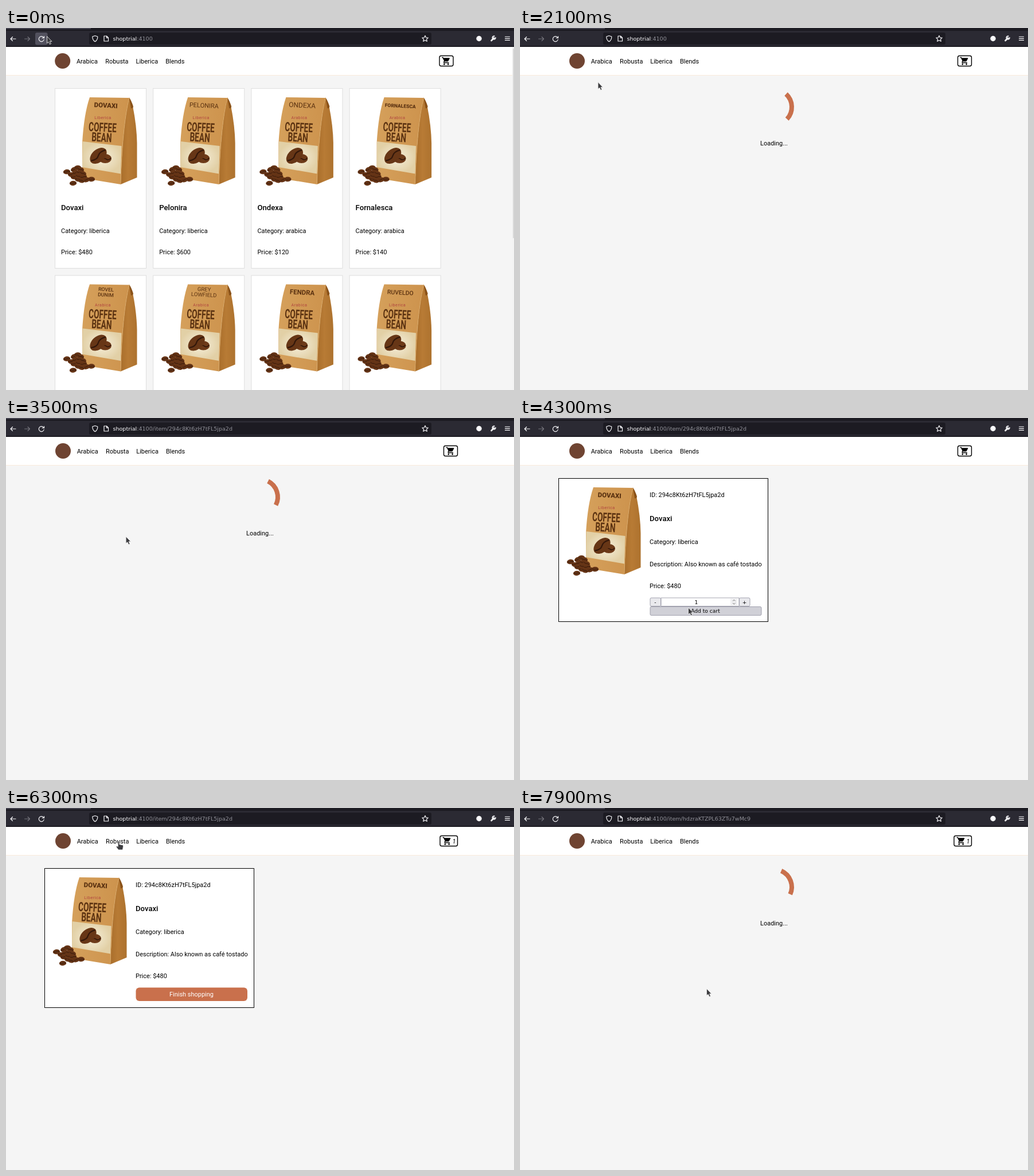
Recreate the animation shown at these times as an HTML page. Size 886x632 px, loop 8000 ms.

```html
<!DOCTYPE html>
<html lang="en">
<head>
<meta charset="utf-8">
<title>Coffee shop</title>
<style>
html, body { margin: 0; width: 100%; height: 100%; overflow: hidden; background: #fff; }
svg { display: block; }
text { font: 10.96px Roboto, sans-serif; white-space: pre; }
.name { font-size: 13.15px; font-weight: 500; }
.ui text { font: 9.56px "DejaVu Sans", sans-serif; }
.btn { font: 9.15px "DejaVu Sans", sans-serif; }
.mid { text-anchor: middle; }
.icon { fill: none; stroke: #fbfbfe; stroke-width: 1.15; stroke-linecap: round; stroke-linejoin: round; }
.ink { fill: #5b3211; }
.block { font: 700 22px Roboto, sans-serif; }
.kind { font-size: 7.2px; letter-spacing: .5px; fill: #b0433f; }
.hidden { display: none; }
</style>
</head>
<body>
<svg id="stage" width="886" height="632" viewBox="0 0 886 632">
<defs>
  <linearGradient id="side"><stop offset="0" stop-color="#a96e2b"/><stop offset=".45" stop-color="#b87b35"/><stop offset="1" stop-color="#ad722e"/></linearGradient>
  <linearGradient id="face"><stop offset="0" stop-color="#d5a05b"/><stop offset="1" stop-color="#cd934d"/></linearGradient>
  <radialGradient id="cream"><stop offset="0" stop-color="#f6efdb"/><stop offset="1" stop-color="#e2d0a6"/></radialGradient>
  <g id="bean"><ellipse rx="6.2" ry="4.2" fill="#653416"/><path d="M-5.2-.6Q-1.5 1 0 0T5.2.6" fill="none" stroke="#34180a" stroke-width=".9"/></g>
  <g id="bag">
    <path d="M130 16 136 31Q143 66 143.500 96V156L115 168Q118 65 130 16Z" fill="url(#side)"/>
    <path d="M130 17Q133 20 137 32 136 36 133 35Z" fill="#8a5219"/>
    <path d="M61 16 130 17Q118 65 115 168L48 157V95Q51 45 61 16Z" fill="url(#face)"/>
    <path d="M48.500 93 116.500 101 115 149.500 48 138Z" fill="url(#cream)"/>
    <path d="M130 17Q118 65 115 168" fill="none" stroke="#dcae6e" stroke-width=".7"/>
    <g transform="translate(88 121)">
      <ellipse rx="11" ry="8" transform="translate(0 2)" fill="#6d3a19"/>
      <path d="M-8 4Q-2 0 2 3T10 1" fill="none" stroke="#34180a" stroke-width="1.6"/>
      <g transform="translate(-12 -3) rotate(-42)"><ellipse rx="17" ry="11" fill="#673616"/><path d="M-15-2Q-6 4 0 0T16 1" fill="none" stroke="#32170a" stroke-width="2.200"/></g>
    </g>
    <g id="pile"></g>
  </g>
  <path id="cart" transform="scale(.685)" d="M7 18c-1.100 0-1.990.9-1.990 2S5.900 22 7 22s2-.9 2-2-.9-2-2-2zM1 2v2h2l3.600 7.590-1.350 2.450c-.16.28-.25.61-.25.96 0 1.100.9 2 2 2h12v-2H7.420c-.14 0-.25-.11-.25-.25l.03-.12.9-1.630h7.450c.75 0 1.410-.41 1.750-1.030l3.580-6.490A1 1 0 0 0 20 4H5.210l-.94-2H1zm16 16c-1.100 0-1.990.9-1.990 2s.89 2 1.990 2 2-.9 2-2-.9-2-2-2z"/>
</defs>

<rect width="886" height="632" fill="#fff"/>
<g id="page">
  <rect y="83" width="886" height="549" fill="#f5f5f5"/>
  <rect y="82" width="886" height="1" fill="#faebdc"/>
  <g id="nav">
    <circle cx="99.500" cy="57.500" r="13.500" fill="#6f4432"/>
    <text x="123.700" y="61.700">Arabica</text><text x="174" y="61.700">Robusta</text>
    <text x="227.300" y="61.700">Liberica</text><text x="279" y="61.700">Blends</text>
  </g>
  <g id="cartEmpty"><rect x="763.500" y="48.500" width="24" height="18" rx="3" fill="none" stroke="#000" stroke-width="1.400"/><use href="#cart" transform="translate(767 49.500)"/></g>
  <g id="cartFull"><rect x="757" y="48.500" width="30.500" height="18" rx="3" fill="none" stroke="#000" stroke-width="1.400"/><use href="#cart" transform="translate(761 49.500)"/><text x="778.500" y="61.700" font-style="italic" style="font-style:italic">1</text></g>
  <g id="grid"></g>
  <g id="list"></g>
  <g id="load">
    <path id="spin" d="M-21.900-21.900A31 31 0 0 1 21.900-21.900" fill="none" stroke="#c9704c" stroke-width="8"/>
    <text x="443" y="205.300" class="mid">Loading...</text>
  </g>
  <g id="item">
    <rect id="itemBox" x="67.500" y="105.500" width="365" fill="#fff" stroke="#000"/>
    <g id="itemBag" transform="translate(67 105)"></g>
    <text x="226" y="137.500">ID: 294c8Kt6zH7tFL5jpa2d</text>
    <text x="226" y="180" class="name">Dovaxi</text>
    <text x="226" y="220.300">Category: liberica</text>
    <text x="226" y="258.500">Description: Also known as café tostado</text>
    <text x="226" y="297">Price: $480</text>
    <g id="order" stroke="#8f8f9d" stroke-width=".8">
      <rect x="246" y="314" width="136" height="14.500" fill="#fff"/>
      <rect x="367" y="315.500" width="12" height="11.500" fill="#f0f0f2" stroke="none"/>
      <path d="M371 319.500 373.300 317.500 375.600 319.500M371 323 373.300 325 375.600 323" fill="none" stroke="#555"/>
      <rect x="227" y="314" width="18.500" height="14.500" rx="2" fill="#e9e9ed"/>
      <rect x="382.500" y="314" width="18.500" height="14.500" rx="2" fill="#e9e9ed"/>
      <rect id="add" x="227" y="329.500" width="194" height="15" rx="2"/>
      <g stroke="none"><text class="btn mid" x="236" y="324.500">-</text><text class="btn mid" x="307.500" y="324.500">1</text>
      <text class="btn mid" x="391.500" y="324.500">+</text><text class="btn mid" x="323.500" y="340.300">Add to cart</text></g>
    </g>
    <g id="finish"><rect x="226.500" y="313.500" width="194.500" height="23.500" rx="6" fill="#c9704c"/><text class="mid" x="323.500" y="329" fill="#fff">Finish shopping</text></g>
  </g>
  <g id="bar"><rect id="track" x="883" y="33" width="3" height="599"/><rect id="thumb" x="884" y="36" width="2" height="331" rx="1"/></g>
</g>

<g class="ui">
  <rect width="886" height="33" fill="#2b2a33"/>
  <rect width="886" height="5" fill="#1c1b22"/>
  <rect width="148" height="2" fill="#42414d"/>
  <rect y="31.500" width="886" height="1.500" fill="#15141a"/>
  <rect x="145" y="8" width="597" height="21" rx="3" fill="#1c1b22"/>
  <rect id="hover" x="51" y="8" width="21.500" height="21.500" rx="3" fill="#52515e"/>
  <g class="icon">
    <path d="M17 19H8M11.500 15.500 8 19 11.500 22.500"/>
    <path d="M32.500 19H41.500M38 15.500 41.500 19 38 22.500" stroke="#75747d"/>
    <path id="reload" d="M65.400 16.500A4.500 4.500 0 1 0 66.200 20M66.500 14.500V17.500H63.300"/>
    <path id="stop" d="M58.500 15.500 65.500 22.500M65.500 15.500 58.500 22.500"/>
    <path d="M155.300 13.500 159.800 15Q160 21 155.300 23.800 150.600 21 150.800 15Z"/>
    <path d="M171 14H175.500L178.500 17V23H171ZM175.300 14V17.200H178.500"/>
    <path d="M731 13.300 732.600 16.700 736.200 17.100 733.500 19.600 734.300 23.300 731 21.500 727.700 23.300 728.500 19.600 725.800 17.100 729.400 16.700Z"/>
    <path d="M846.500 22 851 17.500" stroke-width="2.600"/>
    <path d="M853.800 17A2.700 2.700 0 1 1 851.600 14.300" stroke-width="1.900"/>
    <path d="M870.500 15.200H878.500M870.500 18.300H878.500M870.500 21.400H878.500"/>
  </g>
  <circle cx="825" cy="18.500" r="4.700" fill="#fbfbfe"/>
  <text x="186.500" y="22.200" fill="#fbfbfe">shoptrial<tspan fill="#92929a">:4100<tspan id="path"></tspan></tspan></text>
</g>
<rect id="status" y="631" height="1" fill="#55555c"/>
<g id="cursor" stroke="#f4f4f4" stroke-width=".8" stroke-linejoin="round">
  <path id="arrow" d="M0 0V12L2.700 9.800 4.800 14 7 13 5 8.900H8.500Z" fill="#3c3c3f"/>
  <path id="hand" d="M-1.300 1Q0-.6 1.300 1V6L7 7.200Q8.200 7.800 8 9.500L7 15.500H-.5L-4.200 10.500Q-4.300 8.500-2.500 9L-1.300 10Z" fill="#3c3c3f"/>
</g>
</svg>

<script>
const $ = id => document.getElementById(id);
const LOOP = 8000, STEP = 100;

// label lines, category, price, lettering size, lettering weight
const products = [
  ['Dovaxi', 'liberica', 480, 11.5, 800], ['Pelonira', 'liberica', 600, 11, 400],
  ['Ondexa', 'arabica', 120, 12, 400], ['Fornalesca', 'arabica', 140, 8.5, 800],
  ['Rovel Dunim', 'arabica', 160, 8.8, 500], ['Grey Lowfield', 'arabica', 210, 9.5, 400],
  ['Fendra', 'arabica', 130, 11.5, 700], ['Ruveldo', 'liberica', 320, 10.5, 500]
];
const robustas = [['Tormeka', 'robusta', 90, 10.5, 800], ['Sulvino', 'robusta', 110, 11, 500]];

const pile = [[34, 142], [40, 139], [45, 142], [21, 146], [29, 151], [36, 148], [43, 147], [49, 149],
  [34, 155], [42, 154], [50, 155], [41, 159], [55, 160], [64, 159], [46, 161], [32, 166]];
$('pile').innerHTML = pile.map(([x, y], i) =>
  `<use href="#bean" transform="translate(${x} ${y}) rotate(${i * 17 % 40 - 20})"/>`).join('');

function bag([name, kind, , size, weight]) {
  const lines = name.toUpperCase().split(' ');
  const label = lines.map((line, i) =>
    `<text class="ink mid" y="${lines.length > 1 ? i * 9.5 - 6 : 0}" style="font-size:${size}px;font-weight:${weight}">${line}</text>`).join('');
  const block = (word, x, y) =>
    `<text class="ink block mid" transform="translate(${x} ${y}) rotate(3) scale(.62 1)">${word}</text>`;
  return `<use href="#bag"/><g transform="translate(89 34) rotate(3)">${label}</g>
    <text class="kind mid" x="84" y="54">${kind[0].toUpperCase() + kind.slice(1)}</text>
    ${block('COFFEE', 83, 76)}${block('BEAN', 81.5, 93.5)}`;
}

function card(product, i, left) {
  const [name, kind, price] = product;
  const x = left + i % 4 * 171.2, y = 105 + (i >> 2) * 326.5;
  return `<g transform="translate(${x} ${y})">
    <rect x=".5" y=".5" width="159" height="314" fill="#fff" stroke="#dedede"/>
    ${bag(product)}
    <text class="name" x="11" y="213">${name}</text>
    <text x="11" y="252.700">Category: ${kind}</text>
    <text x="11" y="289.700">Price: $${price}</text></g>`;
}

$('grid').innerHTML = products.map((p, i) => card(p, i, 85)).join('');
$('list').innerHTML = robustas.map((p, i) => card(p, i, 86)).join('');
$('itemBag').innerHTML = bag(products[0]);

const firstItem = '/item/294c8Kt6zH7tFL5jpa2d', category = '/category/robusta';
// start, scene, path, spinner start
const scenes = [
  [0, 'grid', ''], [600, 'blank', ''], [900, 'load', '', 856], [2300, 'grid', ''],
  [3300, 'load', firstItem, 3300], [3900, 'item', firstItem],
  [6500, 'load', category, 6450], [7000, 'list', category],
  [7800, 'load', '/item/hdzraKTZPL63ZTu7wMc9', 7708]
];
// start, width of the link bar
const statuses = [[0, 0], [600, 195], [900, 0], [3100, 200], [3400, 0], [5100, 170], [5600, 0],
  [6400, 190], [6600, 0], [7700, 205], [7800, 0]];
// time, x, y, hand
const moves = [
  [0, 71.5, 14.5, 0], [100, 71.5, 14.5, 0], [400, 67.5, 19.5, 0], [1400, 67.5, 19.5, 0],
  [2100, 136, 94.5, 0], [2300, 168, 142, 0], [2400, 171.5, 142, 1], [3000, 171.5, 142, 1],
  [3100, 179.5, 172.5, 1], [3300, 179.5, 172.5, 0], [4100, 298, 310, 0], [4300, 293.5, 331, 0],
  [4400, 293.5, 331, 0], [4600, 293.5, 333, 0], [4800, 293.5, 333, 1], [5400, 293.5, 333, 0],
  [6300, 196.5, 57.5, 1], [6500, 196.5, 57.5, 0], [7200, 313.5, 251.5, 1],
  [7500, 326, 309, 1], [7700, 326, 309, 1], [7800, 325.5, 315.5, 0], [8000, 325.5, 315.5, 0]
];

const current = (table, t) => table.findLast(row => row[0] <= t);
const show = (id, on) => $(id).classList.toggle('hidden', !on);

function render(t) {
  const [, scene, path, spinStart] = current(scenes, t);
  const bought = t >= 4800, scrolls = scene === 'grid';
  show('page', scene !== 'blank');
  for (const id of ['grid', 'list', 'load', 'item']) show(id, id === scene);

  // the scrollbar is faint until the pointer has moved over the page
  const awake = t >= 2300;
  show('bar', scrolls);
  $('track').setAttribute('fill', awake ? '#e4e4e4' : '#f4f4f4');
  $('thumb').setAttribute('fill', awake ? '#7d7d7d' : '#dadada');

  $('nav').setAttribute('transform', `translate(${scrolls ? -.8 : 0} 0)`);
  $('cartEmpty').setAttribute('transform', `translate(${scrolls ? -7.5 : 0} 0)`);
  show('cartEmpty', !bought);
  show('cartFull', bought);
  show('order', !bought);
  show('finish', bought);
  $('itemBox').setAttribute('height', bought ? 243 : 250);
  $('add').setAttribute('fill', t >= 4300 ? '#d0d0d7' : '#e9e9ed');
  if (scene === 'load') $('spin').setAttribute('transform', `translate(443 138) rotate(${(t - spinStart) * .36})`);

  $('path').textContent = path;
  $('status').setAttribute('width', current(statuses, t)[1]);
  show('hover', t < 900);
  const stopping = t >= 900 && t < 1500;
  show('stop', stopping);
  show('reload', !stopping);

  const from = current(moves, t), to = moves[moves.indexOf(from) + 1];
  const k = (t - from[0]) / (to[0] - from[0]);
  const at = i => from[i] + (to[i] - from[i]) * k;
  $('cursor').setAttribute('transform', `translate(${at(1)} ${at(2)})`);
  show('arrow', !from[3]);
  show('hand', from[3]);
}

const began = performance.now();
function tick() {
  const t = (performance.now() - began) % LOOP;
  render(Math.floor(t / STEP) * STEP);
  requestAnimationFrame(tick);
}
tick();
</script>
</body>
</html>
```
